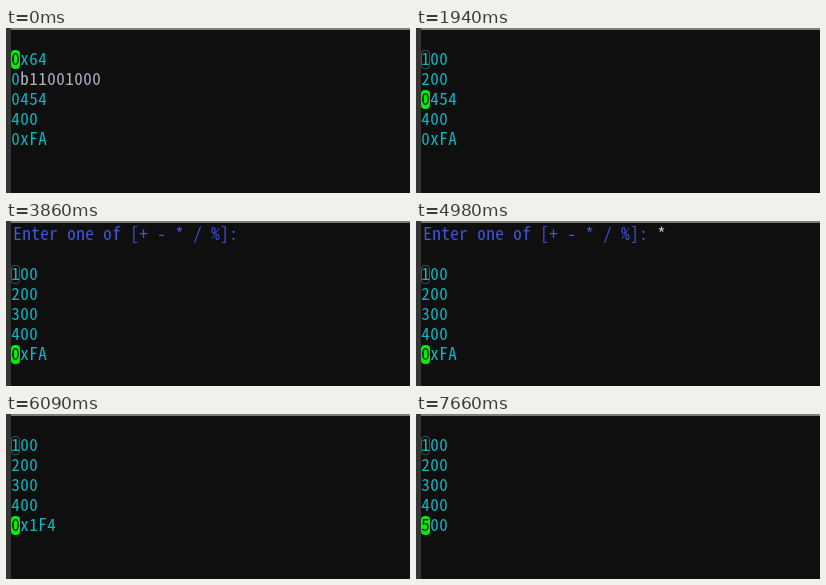
An HTML page for the animation above (8.63 s loop, 404 by 165 pixels).

```html
<!DOCTYPE html>
<html lang="en">
<head>
<meta charset="utf-8">
<title>Number base cycling</title>
<style>
html, body { margin: 0; width: 100%; height: 100%; overflow: hidden; background: #0f0f0f; }
svg { display: block; }
text {
  font: 17px "Noto Sans Mono CJK JP", "Noto Sans Mono CJK SC", "Noto Sans Mono", monospace;
  text-anchor: middle;
}
.num { fill: #0fb5c0; }
.plain { fill: #b5b0c0; }
.prompt { fill: #3f58dc; }
.input { fill: #cdc9d6; }
.under { fill: #0f0f0f; }
.cursor { fill: #00ee00; }
.mark { fill: none; stroke: #505050; }
</style>
</head>
<body>
<svg width="404" height="165" viewBox="0 0 404 165">
  <rect width="404" height="165" fill="#0f0f0f"/>
  <rect width="5" height="165" fill="#343434"/>
  <rect x="5" width="399" height="2" fill="#7c7c7c"/>
  <g id="screen"></g>
</svg>
<script>
const LOOP = 8630, CELL = 9, ROW = 20, PROMPT_ROW = 22;
const screen = document.getElementById('screen');
const ASK_OP = 'Enter one of [+ - * / %]:';
const ASK_BY = 'Multiply by:';

const start = {
  rows: ['0x64', '0b11001000', '0454', '400', '0xFA'],
  cursor: 0, mark: false, prompts: []
};
const row = (index, value) => s => ({ rows: s.rows.with(index, value) });
const cursor = index => () => ({ cursor: index, mark: true });
const prompts = (...lines) => () => ({ prompts: lines });

const steps = [
  [560, row(0, '0b01100100')],
  [700, row(0, '0144')],
  [820, row(0, '100')],
  [1100, cursor(1)],
  [1380, row(1, '0310')],
  [1530, row(1, '200')],
  [1940, cursor(2)],
  [2370, row(2, '300')],
  [2650, cursor(3)],
  [2770, cursor(4)],
  [3860, prompts([ASK_OP])],
  [4980, prompts([ASK_OP, '*'])],
  [5230, prompts([ASK_BY], [ASK_OP, '*'])],
  [5660, prompts([ASK_BY, '2'], [ASK_OP, '*'])],
  [6090, s => ({ prompts: [], ...row(4, '0x1F4')(s) })],
  [6900, row(4, '0b0000000111110100')],
  [7360, row(4, '0764')],
  [7660, row(4, '500')]
];

// Each state is the previous one plus its change.
const states = [start];
for (const [, change] of steps) {
  const last = states.at(-1);
  states.push({ ...last, ...change(last) });
}

function add(tag, attrs, content = '') {
  const node = document.createElementNS('http://www.w3.org/2000/svg', tag);
  for (const name in attrs) node.setAttribute(name, attrs[name]);
  node.textContent = content;
  screen.append(node);
}

// Centre every character in its terminal cell.
function write(string, x, y, kind) {
  const xs = [...string].map((_, i) => x + (i + 0.5) * CELL);
  add('text', { x: xs.join(' '), y, class: kind }, string);
}

function draw(state) {
  screen.replaceChildren();
  state.prompts.forEach(([ask, answer], i) => {
    const y = 19 + i * PROMPT_ROW;
    write(ask, 7, y, 'prompt');
    if (answer) write(answer, 7 + (ask.length + 1) * CELL, y, 'input');
  });

  const top = 22 + state.prompts.length * PROMPT_ROW;
  state.rows.forEach((value, i) => {
    const y = top + i * ROW;
    const active = i === state.cursor;
    if (active) {
      add('rect', { x: 5, y, width: 9, height: 19, rx: 4, class: 'cursor' });
    } else if (i === 0 && state.mark) {
      add('rect', { x: 5.5, y: y + 0.5, width: 8, height: 18, rx: 3, class: 'mark' });
    }
    write(value[0], 5, y + 15, active ? 'under' : 'num');
    write(value.slice(1), 5 + CELL, y + 15, value[1] === 'b' ? 'plain' : 'num');
  });
}

let shown = -1;
const began = performance.now();
function tick() {
  const time = (performance.now() - began) % LOOP;
  const index = steps.filter(([at]) => at <= time).length;
  if (index !== shown) draw(states[shown = index]);
  requestAnimationFrame(tick);
}
tick();
</script>
</body>
</html>
```
